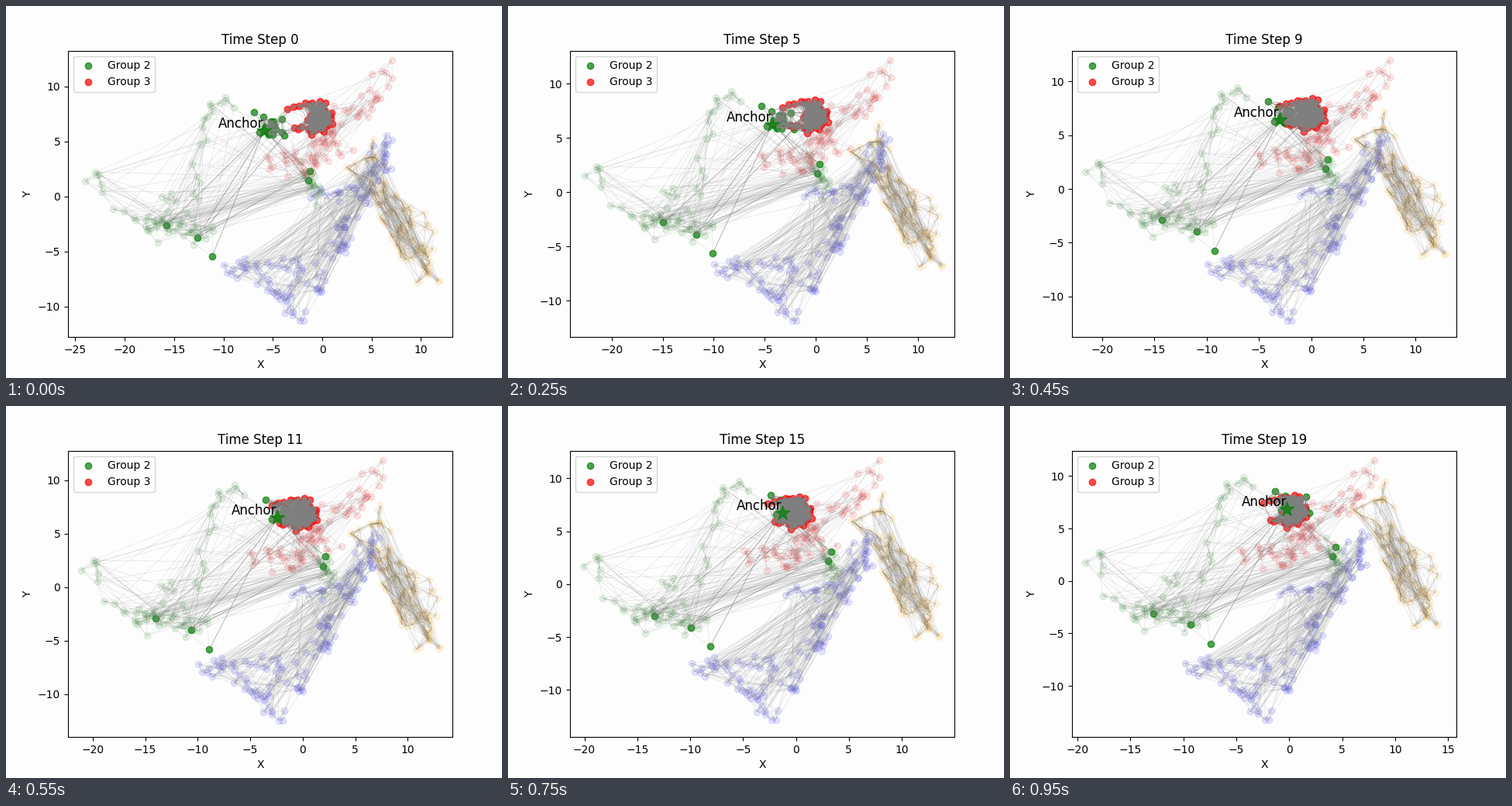
Write a matplotlib script that moves like this. It is 640 by 480 pixels and loops after 1 s.

```python
import numpy as np
import matplotlib.pyplot as plt
from matplotlib.animation import FuncAnimation
from matplotlib.collections import LineCollection

STEPS = 20
PAPER = "#fdfdfd"
rng = np.random.default_rng(11)


def trail(count, spread, *path):
    """Points scattered evenly along a polyline."""
    path = np.array(path, float)
    where = np.linspace(0, len(path) - 1, count)
    line = [np.interp(where, range(len(path)), axis) for axis in path.T]
    return np.column_stack(line) + rng.normal(scale=spread, size=(count, 2))


def web(points, targets, near, far):
    """Index pairs: each point to its nearest neighbours and to random targets."""
    gap = np.linalg.norm(points[:, None] - targets[None], axis=2)
    close = np.argsort(gap, axis=1)[:, 1:near + 1]
    distant = rng.integers(len(targets), size=(len(points), far))
    ends = np.hstack([close, distant])
    starts = np.repeat(np.arange(len(points)), near + far)
    return np.column_stack([starts, ends.ravel()])


def green_drift(x, y):
    bend = np.tanh((y + 0.5) / 2)
    return 4.25 + 1.2 * bend + 0.03 * (x + 12), 0.15 + 0.65 * bend + 0.02 * (x + 12)


def red_drift(x, y):
    return 1 + 0 * x, -0.6 - 0.025 * y


def core_drift(x, y):
    return 0.7 - 0.12 * x, -0.5 + 0 * y


def blue_drift(x, y):
    return 0.25 + 0.02 * y, -1.2 + 0.065 * y


def orange_drift(x, y):
    return 3.2 + 0.13 * y, 4.0 + 0.06 * y


def eased(t):
    return t + 0.13 * t * (1 - t)


class Group:
    def __init__(self, color, drift, *trails):
        self.color = color
        self.start = np.vstack(trails)
        self.drift = np.column_stack(drift(*self.start.T))

    def at(self, t):
        return self.start + self.drift * t


blue = Group(
    "blue", blue_drift,
    trail(26, 0.5, (-10, -6.9), (-8, -6), (-5, -6.2), (-0.5, -5.6)),
    trail(24, 0.6, (-6.5, -7.5), (-4, -9.2), (-3.9, -9.4), (-2.3, -11.2)),
    trail(14, 0.4, (-3.2, -6.8), (-0.4, -7.7), (-0.2, -8.9)),
    trail(24, 0.45, (2, -5), (1.8, -4), (2.3, -2)),
    trail(10, 0.4, (-1, 0), (3, 0.9)),
    trail(16, 0.8, (2.8, -1), (5, 1.5)),
    trail(28, 0.7, (4.8, 1.5), (5.8, 2.8), (6.3, 5.2)))
green = Group(
    "green", green_drift,
    trail(9, 0.3, (-23.7, 1.6), (-22.6, 2.3), (-21.7, -0.3), (-19, -1.8)),
    trail(16, 0.35, (-12.7, -1.5), (-12.5, 4.6), (-11.8, 7), (-10.7, 8.7), (-9.3, 7.8)),
    trail(42, 0.65, (-18, -2.7), (-15.5, -2.4), (-11.5, -3.6)),
    trail(6, 0.8, (-16.3, 1.2), (-13, -0.5)),
    trail(20, 0.35, (-1.7, 2.5), (-0.4, -0.2)))
red = Group(
    "red", red_drift,
    trail(24, 0.65, (6.6, 11.8), (5.4, 9.8), (4.4, 7.8), (2, 7.3)),
    trail(54, 0.65, (1.2, 6), (0.2, 5), (-1.8, 3.2), (-4.8, 2.6)),
    trail(4, 0.4, (1, 3.3), (3.2, 4)))
orange = Group(
    "orange", orange_drift,
    trail(32, 0.8, (4.7, 4), (5.4, 1.5), (6.4, -0.8)),
    trail(48, 0.85, (6.3, -1), (8, -3.6), (9.3, -4.2)),
    trail(26, 0.7, (9.6, -4), (10.2, -6), (10.5, -8)),
    trail(10, 0.6, (8.6, -1), (10.4, -2.8)),
    trail(4, 0.4, (2, 2.9), (3.6, 2)))

# the anchor, three far nodes and two lower nodes
hub = Group(
    "green", green_drift,
    [(-5.9, 6.0), (-15.78, -2.63), (-12.65, -3.76), (-11.16, -5.46),
     (-1.27, 2.3), (-1.43, 1.46)],
    trail(7, 0.25, (-7, 7.6), (-5.3, 6.6), (-3.8, 7), (-3.8, 5.2)),
    trail(9, 0.3, (-5.9, 5.9), (-5.4, 6.1)))
hub.drift[:4] = [(5.65, 0.89), (2.95, -0.5), (3.33, -0.4), (3.74, -0.55)]
core = Group(
    "red", core_drift,
    trail(18, 0.12, (-3.4, 7.9), (-2, 8.6), (0.2, 8.8), (0.9, 7), (0.1, 5.9),
          (-1.5, 6.2), (-3, 6.2)),
    trail(42, 0.48, (-0.6, 7.5), (-0.1, 7.1)))

HUB_LINKS = [(0, 1), (0, 2), (12, 2), (0, 3), (0, 4), (14, 5), (2, 4)]

# group, nodes it also links to, timing, near and far links per point
FAINT = [(blue, None, float, 3, 2), (green, hub, eased, 3, 2),
         (red, core, float, 3, 1), (orange, None, float, 5, 2)]


def reach(group, partner, t):
    points = group.at(t)
    return points if partner is None else np.vstack([points, partner.at(t)])


WEBS = [web(group.start, reach(group, partner, 0), near, far)
        for group, partner, _, near, far in FAINT]

fig, ax = plt.subplots(figsize=(6.4, 4.8), dpi=100, facecolor=PAPER)


def add_links(starts, ends, width, alpha):
    ax.add_collection(LineCollection(
        np.stack([starts, ends], axis=1), colors="gray", linewidths=width,
        alpha=alpha, zorder=2), autolim=False)


def draw(step):
    t = step / (STEPS - 1)
    ax.clear()
    ax.set_facecolor(PAPER)

    for (group, partner, timing, *_), pairs in zip(FAINT, WEBS):
        ends = reach(group, partner, timing(t))
        ax.scatter(*group.at(timing(t)).T, color=group.color, alpha=0.1)
        add_links(ends[pairs[:, 0]], ends[pairs[:, 1]], 0.4, 0.25)

    hub_pos, core_pos = hub.at(eased(t)), core.at(t)
    ax.scatter(*hub_pos.T, color="green", alpha=0.7, label="Group 2")
    ax.scatter(*core_pos.T, color="red", alpha=0.7, label="Group 3")

    bright = np.vstack([hub_pos, core_pos])
    gap = np.linalg.norm(bright[:, None] - bright[None], axis=2)
    i, j = np.nonzero(np.triu(gap < 1.8, 1))
    add_links(bright[i], bright[j], 0.5, 0.8)
    i, j = np.transpose(HUB_LINKS)
    add_links(hub_pos[i], hub_pos[j], 0.5, 0.8)

    anchor = hub_pos[0]
    ax.scatter(*anchor, marker="*", s=200, color="green", alpha=0.7, zorder=3)
    ax.text(*anchor, "Anchor", fontsize=12, ha="right", va="bottom", zorder=4)

    ax.set_xlim(-25.745 + 5.235 * (t + 0.29 * t * (1 - t)),
                np.interp(step, [0, 9, 15, 19], [13.18, 13.90, 14.98, 15.77]))
    ax.set_ylim(-12.80 - 2.09 * t, 13.27 - 0.84 * t)
    ax.set_xlabel("X")
    ax.set_ylabel("Y")
    ax.set_title(f"Time Step {step}")
    ax.legend(loc="upper left")
    return []


anim = FuncAnimation(fig, draw, frames=STEPS, interval=50, repeat=True,
                     repeat_delay=0, init_func=lambda: [])
plt.show()
```
